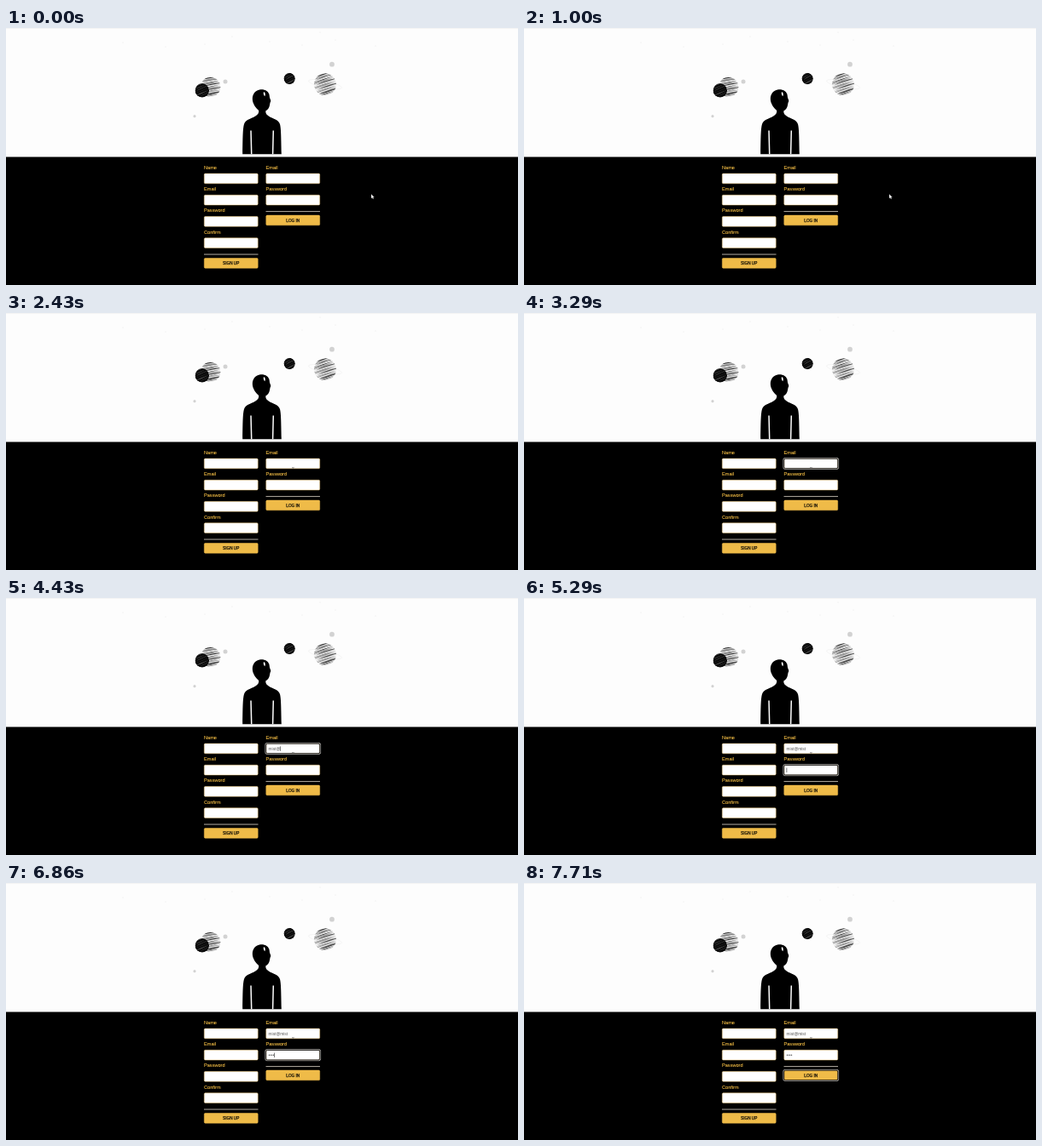
These frames come from a looping animation (600x302 px, 8 s). An HTML page:

```html
<!DOCTYPE html>
<html lang="en">
<head>
<meta charset="utf-8">
<title>Sign up / Log in</title>
<style>
  html, body { margin: 0; height: 100%; overflow: hidden; background: #000; }
  svg { display: block; width: 100%; height: 100%; }
  text { font-family: "Liberation Sans", Arial, sans-serif; white-space: pre; }
  .label { font-size: 5.6px; fill: #f3bd45; stroke: #f3bd45; stroke-width: .1; }
  .button { font-size: 4.7px; fill: #1a1408; stroke: #1a1408; stroke-width: .25; text-anchor: middle; }
  .value { font-size: 4.8px; fill: #555; }
</style>
</head>
<body>
<svg id="stage" viewBox="0 0 600 302">
  <rect width="600" height="302" fill="#000"/>
  <rect width="600" height="151.5" fill="#fdfdfd"/>
  <path d="M0 .3H600" stroke="#e9e9e9" stroke-width=".6"/>
  <g id="sky"></g>
  <g id="person">
    <path d="M298.3 72.3C303 71.8 307 74 308.3 77.5C309 79.5 308.6 81 309.4 83C310.4 85 310.6 86.2 309.6 87.6C309 90 309 92.5 307.4 94.8C306.3 96.6 305 97 304.3 97.6C304 100.5 305.5 102.3 308.5 104C313 106.5 319.5 108 321 113C322.3 118 322.4 126 322.8 148.2H277.2C277.5 126 277.6 118 279 113C280.5 108 287 106.5 291.5 104C295 102 296.3 100.5 296.2 97C293 94 289 89.5 288.8 83.5C288.7 77.5 292.5 72.9 298.3 72.3Z"/>
    <path d="M287 120.5L287.7 148.3M313.3 120.5L312.6 148.3" stroke="#fdfdfd" stroke-width="1.5"/>
    <path d="M302 75C303.8 75.8 304.2 78 303.3 80.2C302 79 301.4 77 302 75Z" fill="#fff"/>
  </g>
  <g id="form"></g>
  <text id="email" class="value" x="307.6" y="178.8"></text>
  <text id="password" class="value" x="307.6" y="204.1"></text>
  <rect id="caret" width=".6" height="5.4" fill="#222"/>
  <path id="arrow" d="M0 0V5L1.2 3.9L2 5.6L2.9 5.2L2.1 3.6H3.6Z" fill="#fff" stroke="#555" stroke-width=".2"/>
  <path id="mark" d="M335.3 181.1L336.4 181.7L337.5 181.1V182L336.4 182.5L335.3 182Z" fill="#555"/>
</svg>
<script>
const byId = id => document.getElementById(id);

function add(parent, tag, attrs, text) {
  const node = document.createElementNS("http://www.w3.org/2000/svg", tag);
  for (const key in attrs) node.setAttribute(key, attrs[key]);
  if (text) node.textContent = text;
  return parent.appendChild(node);
}

// Sky: specks, moons and marbled planets
const sky = byId("sky");
const dot = (cx, cy, r, fill) => add(sky, "circle", { cx, cy, r, fill });

[[137, 17], [187, 22], [233, 19], [265, 10], [309, 16], [347, 20], [368, 5], [386, 14], [433, 21]]
  .forEach(([x, y]) => dot(x, y, .5, "#e2e2e2"));
dot(257, 63, 2.5, "#d2d2d2");
dot(382, 42.7, 2.9, "#d2d2d2");
dot(221, 103.7, 1.6, "#d2d2d2");

let planetCount = 0;
function planet(cx, cy, r, fill, inks, tilt, bands, weight) {
  const id = "planet" + planetCount++;
  add(add(sky, "clipPath", { id }), "circle", { cx, cy, r });
  const disc = add(sky, "g", { "clip-path": `url(#${id})` });
  add(disc, "circle", { cx, cy, r, fill });
  const marble = add(disc, "g", { transform: `translate(${cx} ${cy}) rotate(${tilt}) scale(${r})` });
  // Each band is a streak that swells in the middle and tapers at both ends.
  for (let i = 0; i < bands; i++) {
    const y = -.92 + 1.84 * i / (bands - 1);
    const bend = .1 * Math.sin(i * 2.3), shift = .3 * Math.sin(i * 4.1);
    const thick = weight * (1 + .6 * Math.sin(i * 1.9));
    add(marble, "path", {
      d: `M${shift - 1.1} ${y + .08}Q${shift - .2} ${y + bend - thick} ${shift + 1.1} ${y - .04}Q${shift - .1} ${y + bend + thick} ${shift - 1.1} ${y + .08}Z`,
      fill: inks[i % inks.length]
    });
  }
}
const PALE_INKS = ["#222", "#999", "#444"], DARK_INKS = ["#777", "#444"];
add(sky, "ellipse", { cx: 374, cy: 66.2, rx: 20, ry: 4, fill: "none", stroke: "#ececec", "stroke-width": .5, transform: "rotate(12 374 66.2)" });
planet(239.8, 69.2, 11.6, "#ececec", PALE_INKS, -8, 14, .1);
planet(229.8, 73.4, 8.3, "#0a0a0a", DARK_INKS, -20, 7, .05);
planet(332.2, 59.5, 6.7, "#0a0a0a", DARK_INKS, -25, 6, .05);
planet(374, 66.2, 13, "#ececec", PALE_INKS, -15, 14, .09);

// Forms
const form = byId("form");
const WIDTH = 63.5, HEIGHT = 11.7, ROW = 25.2, GOLD = "#efbb48";

function box(x, y, fill, stroke) {
  add(form, "rect", { x: x + .3, y, width: WIDTH - .6, height: HEIGHT, rx: 1.2, fill, stroke, "stroke-width": .5 });
}

function column(x, labels, action) {
  labels.forEach((label, i) => {
    add(form, "text", { class: "label", x, y: 166 + i * ROW }, label);
    box(x, 171.1 + i * ROW, "#fff", "#f2cd7c");
  });
  const end = 165 + labels.length * ROW;
  add(form, "path", { d: `M${x} ${end + .2}h${WIDTH}`, stroke: "#b5afa4", "stroke-width": 1 });
  box(x, end + 4.7, GOLD, GOLD);
  add(form, "text", { class: "button", x: x + WIDTH / 2, y: end + 12.2 }, action);
}
column(232, ["Name", "Email", "Password", "Confirm"], "SIGN UP");
column(304.5, ["Email", "Password"], "LOG IN");

function focusRing(y) {
  const ring = add(form, "g", { fill: "none" });
  const outline = (inset, stroke, width) => add(ring, "rect", {
    x: 303.9 + inset, y: y - .7 + inset, width: 64.7 - 2 * inset, height: HEIGHT + 1.4 - 2 * inset,
    rx: 1.8, stroke, "stroke-width": width
  });
  outline(0, "#ddd", .7);
  outline(.8, "#101014", .9);
  return ring;
}
const rings = [171.1, 171.1 + ROW, 220.1].map(focusRing);

// Timeline, in ms
const LOOP = 8000, STEP = 1000 / 7, BLINK = 500;
const FOCUS = [2710, 5000, 7140];
const EMAIL = "mist@mist";
const EMAIL_KEYS = [3860, 4000, 4140, 4285, 4428, 4570, 4710, 4785, 4855];
const PASSWORD_KEYS = [6430, 6570, 6710, 6860];
const POINTER = [[0, 428, 195.3], [1400, 428, 195.3], [1570, 446, 219], [1830, 446, 219], [2430, 335, 181]];

const show = (node, visible) => node.setAttribute("visibility", visible ? "visible" : "hidden");
const pressed = (keys, t) => keys.filter(time => time <= t);

function pointerAt(t) {
  const next = POINTER.findIndex(point => point[0] > t);
  const [t0, x0, y0] = POINTER[next - 1], [t1, x1, y1] = POINTER[next];
  const p = (t - t0) / (t1 - t0), eased = p * p * (3 - 2 * p);
  return [x0 + (x1 - x0) * eased, y0 + (y1 - y0) * eased];
}

function draw(t) {
  const active = pressed(FOCUS, t).length - 1;
  rings.forEach((ring, i) => show(ring, i === active));

  const keys = [pressed(EMAIL_KEYS, t), pressed(PASSWORD_KEYS, t)];
  const fields = [byId("email"), byId("password")];
  fields[0].textContent = EMAIL.slice(0, keys[0].length);
  fields[1].textContent = "•".repeat(keys[1].length);

  const editing = active === 0 || active === 1;
  let caretOn = false;
  if (editing) {
    const since = Math.max(FOCUS[active], ...keys[active]);
    caretOn = (t - since) % (2 * BLINK) < BLINK;
    byId("caret").setAttribute("x", 307.6 + fields[active].getComputedTextLength());
    byId("caret").setAttribute("y", 174.4 + active * ROW);
  }
  show(byId("caret"), caretOn);

  const arrived = t >= 2430;
  show(byId("arrow"), !arrived);
  show(byId("mark"), arrived);
  if (!arrived) {
    const held = Math.floor((t + 2) / STEP) * STEP;
    byId("arrow").setAttribute("transform", `translate(${pointerAt(held)})`);
  }
}

const start = performance.now();
function frame() {
  draw((performance.now() - start) % LOOP);
  requestAnimationFrame(frame);
}
frame();
</script>
</body>
</html>
```
